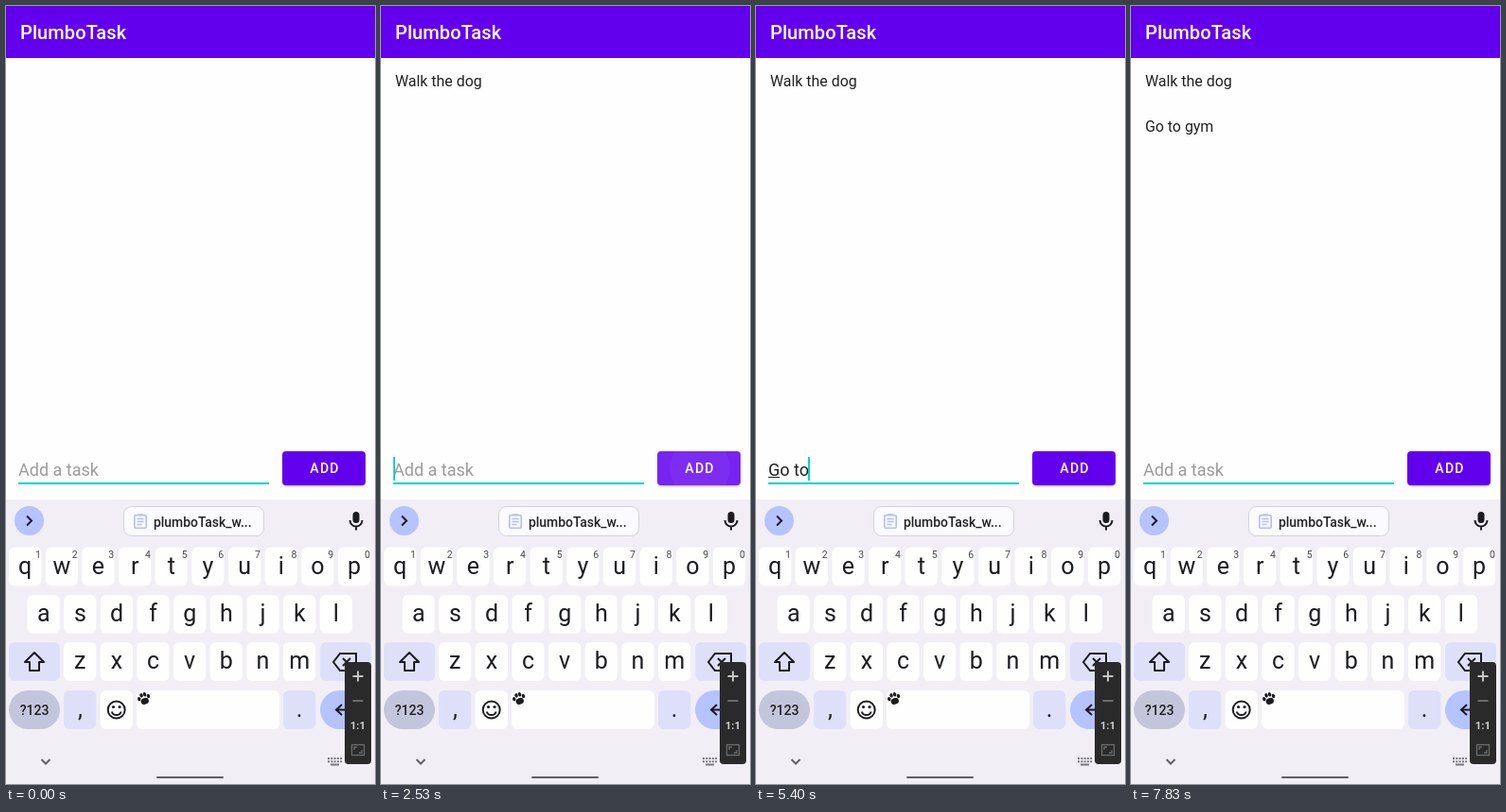
An HTML page for the animation above (8 s loop, 390 px wide and 823 px high).

```html
<!DOCTYPE html>
<html lang="en">
<head>
<meta charset="utf-8">
<title>To-do list</title>
<style>
  html, body { margin: 0; width: 100%; height: 100%; overflow: hidden; background: #fefefe; }
  svg { display: block; width: 390px; height: 823px; font-family: Roboto, sans-serif; }
  text { white-space: pre; fill: #212121; }
  .mid { text-anchor: middle; }
  .title { font: 500 20px Roboto, sans-serif; fill: #fff; letter-spacing: .1px; }
  .item { font-size: 15.9px; }
  .field { font-size: 18px; }
  .hint { fill: #9b9b9b; }
  .add { font: 500 14px Roboto, sans-serif; letter-spacing: 1.25px; fill: #fff; }
  .letter { font-size: 25px; fill: #1b1b20; }
  .digit { font-size: 10.5px; fill: #45464f; }
  .line { fill: none; stroke: #1b1b20; stroke-width: 2; }
</style>
</head>
<body>
<svg viewBox="0 0 390 823">
  <defs>
    <filter id="blur" x="-20%" y="-40%" width="140%" height="200%"><feGaussianBlur stdDeviation="1.2"/></filter>
    <clipPath id="btn"><rect x="292" y="471" width="88" height="36" rx="4"/></clipPath>
  </defs>
  <rect width="390" height="823" fill="#fefefe"/>
  <rect width="390" height="55" fill="#6200ee"/>
  <text class="title" x="15" y="35">PlumboTask</text>

  <text class="item" id="item1" x="15" y="85">Walk the dog</text>
  <text class="item" id="item2" x="15" y="133">Go to gym</text>

  <text class="field hint" id="hint" x="13" y="497">Add a task</text>
  <text class="field" id="typed" x="13" y="497"></text>
  <rect id="mark" y="498" height="1" fill="#212121"/>
  <rect x="13" y="504" width="265" height="2" fill="#03d3c4"/>
  <rect id="caret" y="477" width="2" height="25" fill="#03d3c4"/>

  <rect id="shade" x="293" y="473" width="86" height="35" rx="4" fill="#000" opacity=".35" filter="url(#blur)"/>
  <g clip-path="url(#btn)">
    <rect x="292" y="471" width="88" height="36" fill="#6200ee"/>
    <g id="ripple" fill="#fff">
      <rect x="292" y="471" width="88" height="36" opacity=".14"/>
      <circle cx="337" cy="489" r="32" opacity=".035"/>
    </g>
  </g>
  <text class="add mid" x="337" y="494">ADD</text>

  <rect y="522" width="390" height="301" fill="#f1eff5"/>
  <circle cx="24.5" cy="544.5" r="15.5" fill="#b5c3ff"/>
  <path class="line" d="M22 539.5l5 5-5 5"/>
  <rect x="124.5" y="529.5" width="148" height="31" rx="8" fill="#fbfafe" stroke="#d3d2da"/>
  <g fill="none" stroke="#b2befa" stroke-width="1.6">
    <rect x="135.8" y="538.8" width="12.4" height="13.4" rx="1"/>
    <path d="M139 538h6M138.500 542.500h7M138.500 545.500h7M138.500 548.500h5"/>
  </g>
  <text x="156" y="551" font-size="13.9" font-weight="500">plumboTask_w...</text>
  <rect x="366.500" y="535" width="7" height="12" rx="3.500" fill="#1b1b20"/>
  <path class="line" d="M363.500 544a6.500 6.500 0 0 0 13 0M370 550.500v4"/>

  <g id="keys"></g>

  <path class="line" id="shift" d="M30 684l-10 10h5v9h10v-9h5z" stroke-linejoin="round"/>
  <path class="line" d="M353 685h17v18h-17l-7-9z"/>
  <path class="line" d="M356 690l8 8m0-8l-8 8"/>
  <text class="mid" x="30" y="750" font-size="14" font-weight="500">?123</text>
  <text class="letter mid" x="78.500" y="752" font-size="22">,</text>
  <text class="letter mid" x="310" y="752" font-size="22">.</text>
  <circle class="line" cx="116.700" cy="744.500" r="9"/>
  <path class="line" d="M111.700 746.500a5.300 5.300 0 0 0 10 0"/>
  <g fill="#1b1b20">
    <circle cx="113.500" cy="741.500" r="1.600"/><circle cx="120" cy="741.500" r="1.600"/>
    <g transform="rotate(-18 146 733)">
      <ellipse cx="146" cy="735.500" rx="4.200" ry="3.400"/>
      <ellipse cx="141" cy="731.500" rx="1.700" ry="2.200"/>
      <ellipse cx="144.300" cy="728.600" rx="1.700" ry="2.300"/>
      <ellipse cx="148" cy="728.600" rx="1.700" ry="2.300"/>
      <ellipse cx="151.200" cy="731.500" rx="1.700" ry="2.200"/>
    </g>
  </g>
  <path class="line" d="M355 739l-6 5.500 6 5.500M349 744.500h18v-5"/>
  <path class="line" d="M37.500 797l4.500 4.500 4.500-4.500" stroke-width="1.600" style="stroke:#60606a"/>
  <g stroke="#77777f" stroke-width="2" stroke-dasharray="2 1.300">
    <path d="M340 796h15M340 799.300h15"/><path d="M343 802.500h9" stroke-dasharray="none"/>
  </g>
  <rect x="159" y="815" width="71" height="2" rx="1" fill="#5f5e64"/>

  <rect x="358" y="694" width="28" height="108" rx="4" fill="#2a2a2b"/>
  <path d="M366.500 709h11M372 703.500v11" stroke="#c4c4c4" stroke-width="2"/>
  <path d="M366.500 735h11" stroke="#6c6c6c" stroke-width="2"/>
  <text class="mid" x="372" y="765" font-size="11.500" font-weight="700" style="fill:#d0d0d0">1:1</text>
  <g fill="none" stroke="#6c6c6c" stroke-width="1.300">
    <rect x="365.500" y="781.500" width="13" height="11"/>
    <path d="M368 787v-3h3M373 790h3v-3"/>
  </g>

  <path id="pointer" d="M.8.800L12.500 10 8.500 11l3 4.500-3.500 2-2.500-4.500-3 3z" fill="#17dfc0" stroke="#10242c" stroke-width="1.300" stroke-linejoin="round"/>
</svg>
<script>
const $ = id => document.getElementById(id);
const SVG = 'http://www.w3.org/2000/svg';
const keys = $('keys');

function add(tag, attrs, label) {
  const el = document.createElementNS(SVG, tag);
  for (const name in attrs) el.setAttribute(name, attrs[name]);
  if (label) el.textContent = label;
  keys.append(el);
  return el;
}
const key = (x, y, width, fill = '#fefefe', rx = 6) =>
  add('rect', { x, y, width, height: 41, rx, fill });

const letters = [];
function row(chars, left, y, digits = '') {
  [...chars].forEach((c, i) => {
    const x = left + i * 38.65;
    key(x, y, 34.3);
    letters.push(add('text', { x: x + 17.2, y: y + 28, class: 'letter mid' }, c));
    if (digits) add('text', { x: x + 31, y: y + 11.5, class: 'digit mid' }, digits[i]);
  });
}
row('qwertyuiop', 3, 572.5, '1234567890');
row('asdfghjkl', 22.5, 623);
row('zxcvbnm', 61, 673);
const tint = '#dee0fa';
key(3, 673, 54, tint);
key(332, 673, 54, tint);
key(3, 724, 54, '#c3c5db', 20.5);
key(61, 724, 34.3, tint);
key(99.7, 724, 34.3);
key(138, 724, 151);
key(293, 724, 34.3, tint);
key(332, 724, 54, '#b5c3ff', 20.5);

// Each entry overrides part of the previous state; mark is an underlined [from, to] range.
const start = { text: '', mark: [0, 0], caret: 0, caps: 0, items: 0, press: 0, ripple: 0, pointer: null };
const target = [342, 487];
const steps = [
  [120, { caret: 1, caps: 1 }],
  [240, { text: 'W', mark: [0, 1], caps: 0 }],
  [360, { text: 'Wa' }],
  [480, { text: 'Wal' }],
  [600, { text: 'Walk' }],
  [720, { text: 'Walk t' }],
  [870, { text: 'Walk the ' }],
  [1120, { text: 'Walk the d' }],
  [1240, { text: 'Walk the dog' }],
  [1490, { mark: [9, 12] }],
  [1890, { caret: 0 }],
  [2010, { pointer: [359, 506] }],
  [2130, { pointer: target }],
  [2380, { text: '', mark: [0, 0], caret: 1, press: 1, ripple: .6 }],
  [2530, { items: 1, press: 0, ripple: 1, pointer: null }],
  [2770, { ripple: .7 }],
  [2890, { ripple: .4, caret: 0 }],
  [3010, { ripple: .12 }],
  [3150, { ripple: 0 }],
  [3400, { caret: 1 }],
  [3900, { caret: 0 }],
  [4400, { caret: 1 }],
  [4800, { caps: 1 }],
  [4920, { text: 'G', mark: [0, 1], caps: 0 }],
  [5040, { text: 'Go' }],
  [5160, { text: 'Go ' }],
  [5280, { text: 'Go t' }],
  [5400, { text: 'Go to' }],
  [5550, { text: 'Go to g' }],
  [5670, { text: 'Go to gy' }],
  [5920, { text: 'Go to gym' }],
  [6040, { mark: [6, 9] }],
  [6570, { caret: 0 }],
  [6690, { pointer: target }],
  [7090, { caret: 1 }],
  [7230, { press: 1, ripple: .4 }],
  [7350, { text: '', mark: [0, 0], ripple: 1, pointer: null }],
  [7470, { items: 2, press: 0 }],
  [7590, { ripple: .6 }],
  [7710, { ripple: .2 }],
  [7830, { ripple: 0, caret: 0 }]
];

const ctx = document.createElement('canvas').getContext('2d');
function textX(str) {
  ctx.font = '18px Roboto, sans-serif';
  return Math.floor(13 + ctx.measureText(str).width);
}
const show = (id, on) => $(id).setAttribute('visibility', on ? 'visible' : 'hidden');

function draw(s) {
  const [from, to] = s.mark.map(n => textX(s.text.slice(0, n)));
  $('typed').textContent = s.text;
  show('hint', !s.text);
  $('mark').setAttribute('x', from);
  $('mark').setAttribute('width', to - from);
  $('caret').setAttribute('x', textX(s.text));
  show('caret', s.caret);
  show('item1', s.items > 0);
  show('item2', s.items > 1);
  $('shade').setAttribute('transform', `translate(0 ${s.press ? 3 : 0})`);
  $('ripple').setAttribute('opacity', s.ripple);
  show('pointer', s.pointer);
  if (s.pointer) $('pointer').setAttribute('transform', `translate(${s.pointer})`);
  $('shift').style.fill = s.caps ? '#1b1b20' : 'none';
  for (const el of letters) {
    el.textContent = s.caps ? el.textContent.toUpperCase() : el.textContent.toLowerCase();
  }
}

const t0 = performance.now();
let last = -1;
function tick() {
  const t = (performance.now() - t0) % 8000;
  const past = steps.filter(([at]) => at <= t);
  if (past.length !== last) {
    last = past.length;
    draw(Object.assign({}, start, ...past.map(([, change]) => change)));
  }
  requestAnimationFrame(tick);
}
tick();
</script>
</body>
</html>
```
